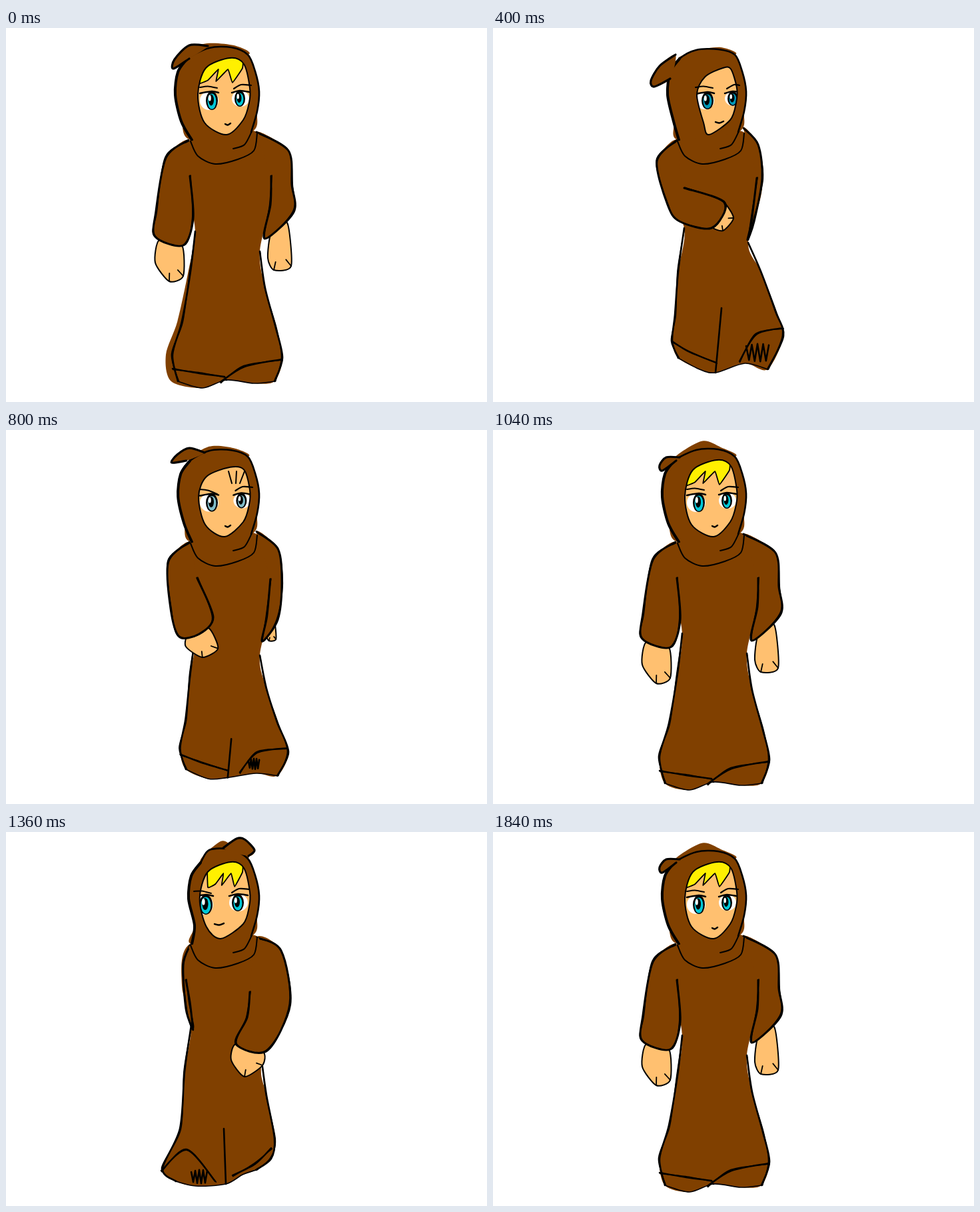
An HTML page with a canvas for the animation above (1920 ms loop, 722 by 561 pixels).

```html
<!DOCTYPE html>
<html lang="en">
<head>
<meta charset="utf-8">
<title>Hooded walk</title>
<style>
html, body { margin: 0; width: 100%; height: 100%; overflow: hidden; background: #fff; }
canvas { display: block; }
</style>
</head>
<body>
<canvas id="stage" width="722" height="561"></canvas>
<script>
const ctx = document.getElementById('stage').getContext('2d');
const BROWN = '#804000', SKIN = '#ffc070', YELLOW = '#fff000', BLACK = '#000';
const STEP = 80, SLOTS = 24;

// "x,y x,y ..." to a list of points
const pts = s => s.split(' ').map(p => p.split(',').map(Number));
const hidden = (x, y) => Array(5).fill([x, y]);

// A pose is a small rig; every number in it can be blended.
const stand = {
  left: pts('272,235 284,305 277,365 264,440 250,490 258,530'),
  right: pts('399,240 381,335 389,390 405,450 415,495 403,530'),
  toes: pts('295,540 331,528 372,533'),
  slit: [331, 528],
  footL: pts('250,511 290,518 328,523'),
  footR: pts('322,531 358,508 414,497'),
  scribble: [345, 520, 0],
  sleeveL: pts('274,168 240,195 225,275 224,313 266,326 281,285 276,222'),
  sleeveR: pts('376,156 424,184 429,235 432,276 388,316 397,265 398,222'),
  handL: pts('230,318 224,352 245,380 266,372 264,326'),
  handR: pts('398,308 393,345 402,363 428,357 422,292'),
  tip: pts('275,46 254,61 250,53 260,41 280,41'),
  cap: [312, 17], back: 254, top: 29,
  turn: 0, drop: 0, chin: 331,
  eyes: [309, 351], iris: [8, 13], slant: 1, mouth: [333, 144, 4],
  part: 289, hair: 'full', tint: '#00c8d8', flare: 0
};

const start = {
  ...stand,
  tip: pts('275,46 251,61 253,47 275,26 303,27'),
  cap: [296, 24], flare: 10
};

const twist = {
  ...stand,
  left: pts('256,230 287,300 278,365 273,430 269,470 278,495'),
  right: pts('404,235 383,322 402,365 424,425 436,462 412,512'),
  toes: pts('310,512 334,517 378,503'),
  slit: [343, 420],
  footL: pts('269,470 295,486 335,502'),
  footR: pts('370,500 395,460 435,450'),
  scribble: [397, 487, 20],
  sleeveL: pts('276,168 246,200 262,265 280,290 328,300 348,262 287,240'),
  sleeveR: pts('376,150 398,175 404,225 392,290 382,318 388,290 396,225'),
  handL: pts('330,280 328,298 345,304 361,285 346,262'),
  handR: hidden(390, 285),
  tip: pts('266,76 242,88 237,79 250,57 274,40'),
  cap: [305, 34], back: 262, top: 32,
  turn: 1, drop: 15, chin: 324,
  eyes: [322, 360], iris: [8, 12], mouth: [340, 141, 6],
  hair: 'none', tint: '#0098b8'
};

const step = {
  ...twist,
  left: pts('256,230 284,312 276,370 273,430 269,470 278,495'),
  right: pts('404,235 381,340 392,385 408,430 430,475 410,511'),
  footR: pts('370,502 390,468 426,464'),
  scribble: [390, 488, 16],
  sleeveL: pts('276,168 246,200 262,265 284,308 305,293 331,278 294,222'),
  handL: pts('305,293 300,306 328,315 353,298 331,278'),
  tip: pts('268,46 245,41 262,26 285,18 310,29'),
  cap: [300, 30], back: 261, top: 31,
  turn: 0.1, drop: 18, chin: 326,
  eyes: [309, 355], slant: 11, mouth: [333, 144, 4],
  hair: 'strands', tint: '#80bcc8'
};

const stride = {
  ...stand,
  left: pts('264,230 278,290 268,360 261,445 235,505 255,524'),
  right: pts('420,230 384,345 391,395 403,460 398,490 375,507'),
  toes: pts('285,531 330,528 355,514'),
  slit: [327, 445],
  footL: pts('233,508 272,477 314,524'),
  footR: pts('340,515 374,498 398,474'),
  scribble: [290, 517, 14],
  sleeveL: pts('276,170 266,200 270,265 280,295 280,290 276,255 270,222'),
  sleeveR: pts('376,158 413,178 426,258 392,328 345,318 362,278 366,240'),
  handL: hidden(274, 262),
  handR: pts('345,318 338,342 358,367 385,350 386,330'),
  tip: pts('326,24 346,10 358,11 373,27 364,36'),
  cap: [322, 14], back: 274, top: 26,
  turn: 0.15, chin: 322,
  eyes: [300, 348], iris: [9, 14], slant: 3, mouth: [320, 138, 7],
  part: 303
};

const plant = {
  ...stand,
  left: pts('268,235 276,320 264,380 257,460 248,515 268,536'),
  right: pts('378,250 382,345 392,390 408,445 416,500 388,523'),
  toes: pts('300,541 327,525 360,521'),
  slit: [324, 460],
  footL: pts('250,518 285,490 326,520'),
  footR: pts('368,520 392,502 417,492'),
  sleeveL: pts('276,168 257,200 251,270 258,317 274,330 279,295 271,235'),
  sleeveR: pts('376,158 416,190 416,245 416,297 372,326 378,290 375,250'),
  handL: pts('257,320 258,348 263,366 268,345 272,330'),
  handR: pts('388,314 380,335 385,354 412,345 416,298'),
  tip: pts('303,28 312,16 325,12 338,17 346,28'),
  cap: [312, 24], back: 275, top: 28,
  chin: 328, eyes: [306, 350], iris: [9, 14], slant: 7
};

const keys = [[0, start], [5, twist], [8, step], [13, stand], [17, stride], [21, plant], [23, stand], [24, start]];

function blend(a, b, u) {
  if (typeof a === 'number') return a + (b - a) * u;
  if (typeof a === 'string') return u < 0.5 ? a : b;
  if (Array.isArray(a)) return a.map((v, i) => blend(v, b[i], u));
  return Object.fromEntries(Object.keys(a).map(k => [k, blend(a[k], b[k], u)]));
}

function poseAt(slot) {
  const i = keys.findIndex(k => k[0] > slot);
  const [t0, a] = keys[i - 1], [t1, b] = keys[i];
  return blend(a, b, (slot - t0) / (t1 - t0));
}

// Smooth curve through the points; slack 0 gives straight edges.
function trace(p, closed, slack = 0.15) {
  const n = p.length;
  const at = i => p[closed ? (i + n) % n : Math.max(0, Math.min(n - 1, i))];
  ctx.beginPath();
  ctx.moveTo(...p[0]);
  for (let i = 0; i < (closed ? n : n - 1); i++) {
    const [a, b, c, d] = [at(i - 1), at(i), at(i + 1), at(i + 2)];
    ctx.bezierCurveTo(
      b[0] + (c[0] - a[0]) * slack, b[1] + (c[1] - a[1]) * slack,
      c[0] - (d[0] - b[0]) * slack, c[1] - (d[1] - b[1]) * slack, ...c);
  }
}

function fill(p, color, slack) {
  trace(p, true, slack);
  ctx.fillStyle = color;
  ctx.fill();
}

function line(p, width, closed, slack) {
  trace(p, closed, slack);
  ctx.lineWidth = width;
  ctx.stroke();
}

const wobble = k => Math.sin(k * 78.2) * 1.6;

// Pen line with a thin, slightly shaky second stroke
function sketch(p, width) {
  line(p, width);
  line(p.map(([x, y], i) => [x + wobble(i + 1), y + wobble(i + 5)]), 1.5);
}

function oval(x, y, rx, ry, color) {
  ctx.beginPath();
  ctx.ellipse(x, y, rx, ry, 0, 0, 7);
  ctx.fillStyle = color;
  ctx.fill();
}

function eye(x, y, rx, ry, lean, tint) {
  const w = rx + 6, wx = x + lean;
  oval(wx, y, w, ry + 1, '#fff');
  oval(x, y, rx + 1, ry + 1, BLACK);
  oval(x, y + 1, rx - 1.5, ry - 1.5, tint);
  oval(x - 1, y - 1, rx * 0.5, ry * 0.65, BLACK);
  oval(x - rx * 0.4, y - ry * 0.3, rx * 0.25, ry * 0.35, '#fff');
  line([[wx - w, y - ry + 2], [x, y - ry - 1], [wx + w, y - ry + 1]], 2.5);
}

function fringe(p) {
  if (p.hair === 'strands') {
    for (let i = 0; i < 3; i++) line([[334 + 12 * i, 62], [339 + 6 * i, 80]], 2);
  }
  if (p.hair !== 'full') return;
  const across = f => p.part + f * (355 - p.part);
  const lock = [[across(0), 83], [across(0.22), 78]];
  for (const [root, end, y] of [[0.45, 0.4, 80], [0.67, 0.77, 82]]) {
    lock.push([across(root), 62], [across(end), y]);
  }
  lock.push([across(1), 60], [355, 30], [p.part, 30]);
  fill(lock, YELLOW, 0.04);
  line(lock, 1.8, true, 0.04);
}

function head(p) {
  const b = p.back, cheek = 288 + 18 * p.turn, brow = 45 + p.drop;
  const hood = [[279, 168], [b + 9, 140], [b, 100], [b + 4, 66], [b + 18, 46], [305, p.top + 1],
    [338, p.top], [363, 40], [374, 65], [380, 95], [377, 125], [368, 156]];
  const face = [[cheek, 100], [cheek + 12, 60 + 0.9 * p.drop], [336 + 9 * p.turn, brow],
    [357, 54 + p.drop / 2], [366, 90], [365, 112], [356, 138], [p.chin, 160], [cheek + 10, 142]];

  fill([hood[4], p.cap, [342, p.top - 3], hood[7]], BROWN);
  fill(hood, BROWN);
  line(hood, 2.6);
  line(hood.slice(0, 5), 4);
  fill(p.tip, BROWN);
  line(p.tip, 3.2);

  const [xl, xr] = p.eyes;
  fill(face, SKIN);
  ctx.save();
  trace(face, true);
  ctx.clip();
  eye(xl, 109, ...p.iris, -4, p.tint);
  eye(xr, 106, p.iris[0] - 1, p.iris[1] - 2, 1, p.tint);
  fringe(p);
  ctx.restore();
  line(face, 2, true);

  line([[xl - 18, 89], [xl - 6, 87 + p.slant / 2], [xl + 8, 89 + p.slant]], 2);
  line([[xr - 9, 91], [xr + 2, 85], [Math.min(xr + 17, 370), 86]], 2.2);
  const [mx, my, mw] = p.mouth;
  line([[mx - mw, my], [mx, my + 1.5], [mx + mw, my - 1]], 2.4);
}

function hand(h) {
  fill(h, SKIN, 0.12);
  line(h, 2, true, 0.12);
  const mid = [0, 1].map(k => h.reduce((s, q) => s + q[k], 0) / h.length);
  for (const k of [2, 3]) line([h[k], blend(h[k], mid, 0.4)], 1.8);
}

function scribble([x, y, size]) {
  if (size < 4) return;
  const zig = Array.from({ length: 9 }, (_, i) =>
    [x + (i / 8 - 0.5) * size * 1.7, y + (i % 2 ? 1 : -1) * size * 0.5 + 2 * wobble(i)]);
  line(zig, 2.6, false, 0);
}

function body(p) {
  const flared = p.left.map(([x, y], i) => [x - p.flare * Math.min(1, Math.max(0, i - 1) / 3), y]);
  fill([[276, 168], ...flared, ...p.toes, ...[...p.right].reverse(), [376, 156]], BROWN);
  sketch(p.left.slice(1), 2.6);
  sketch(p.right.slice(1), 2.6);
  line([p.left[5], ...p.toes, p.right[5]], 1.6);
  sketch(p.footL, 2.4);
  sketch(p.footR, 2.4);
  line([p.slit, p.toes[1]], 2.6);
  scribble(p.scribble);
  for (const side of ['L', 'R']) {
    hand(p['hand' + side]);
    const sleeve = p['sleeve' + side];
    fill(sleeve, BROWN, 0.12);
    trace(sleeve, false, 0.12);
    sketch(sleeve, 3);
  }
}

const collar = pts('277,170 288,192 314,204 348,197 372,184 377,158');
const fold = pts('341,181 358,175 369,155');

function draw(p) {
  ctx.fillStyle = '#fff';
  ctx.fillRect(0, 0, 722, 561);
  ctx.strokeStyle = BLACK;
  ctx.lineCap = ctx.lineJoin = 'round';
  body(p);
  head(p);
  fill(collar, BROWN, 0.1);
  line(collar, 2);
  line(fold, 2);
}

const begin = performance.now();
let shown = -1;

function tick() {
  const slot = Math.floor((performance.now() - begin) / STEP) % SLOTS;
  if (slot !== shown) draw(poseAt(shown = slot));
  requestAnimationFrame(tick);
}
tick();
</script>
</body>
</html>
```
